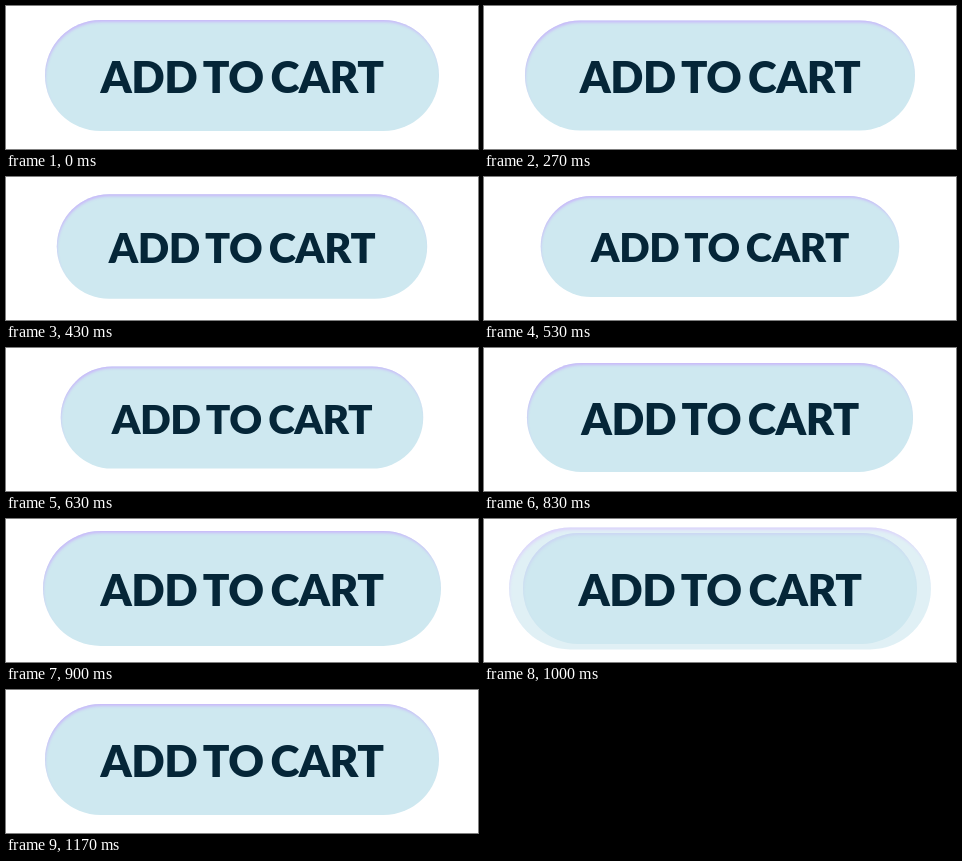
An HTML page that plays this animation: 472x143 px, repeating every 1.76 s.

```html
<!DOCTYPE html>
<html lang="en">
<head>
<meta charset="utf-8">
<title>Add to cart</title>
<style>
html, body { margin: 0; width: 100%; height: 100%; overflow: hidden; background: #fff; }
#stage { position: relative; width: 472px; height: 143px; overflow: hidden; }
.pill {
  position: absolute; border-radius: 58px; background: #cee8f0;
  box-shadow: inset 1px 3px 3px -1px #c9b8fa;
}
#button {
  left: 39px; top: 14px; width: 394px; height: 111px;
  text-align: center; white-space: nowrap; color: #052638;
  font: 900 44px/112px Lato, sans-serif;
  letter-spacing: -0.5px; word-spacing: -2.8px;
}
/* Lies between the button's background and its label. */
#ring { inset: -1.75px; z-index: -1; }
</style>
</head>
<body>
<div id="stage">
  <div class="pill" id="button"><div class="pill" id="ring"></div>ADD TO CART</div>
</div>
<script>
const LOOP = 1760, STEP = 100 / 3;
const button = document.getElementById('button');
const ring = document.getElementById('ring');

function draw(ms) {
  // The motion advances in steps of 1/30 s.
  const step = Math.floor((ms + 4) / STEP);

  // Press to 90% and release, ten linear steps each way.
  const press = Math.max(0, 10 - Math.abs(step - 17));
  button.style.transform = `scale(${1 - press / 100})`;

  // A ring grows and fades once the button is released.
  const spread = (step - 27) / 8;
  const active = spread >= 0 && spread < 1;
  ring.style.opacity = active ? 1 - spread : 0;
  ring.style.transform = `scale(${1 + (active ? 0.16 * spread : 0)})`;
}

const start = performance.now();
function tick() {
  draw((performance.now() - start) % LOOP);
  requestAnimationFrame(tick);
}
tick();
</script>
</body>
</html>
```
